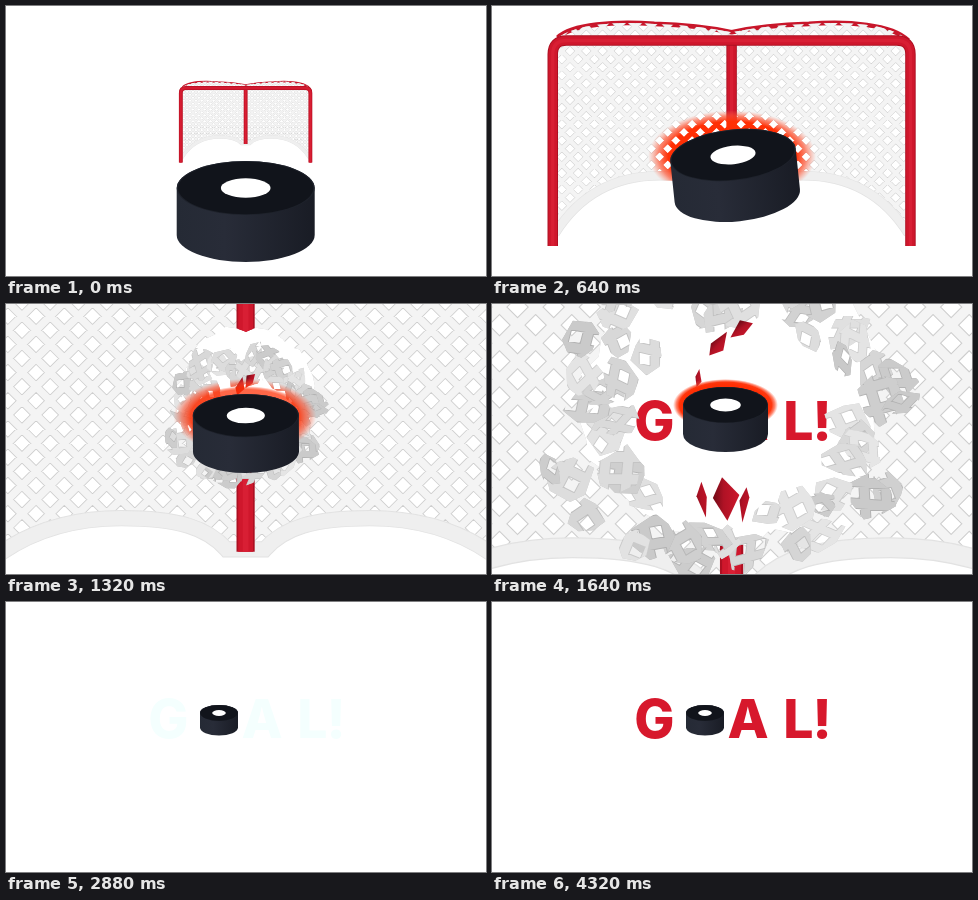
Animation, 480 px wide and 270 px high, one loop 4.8 s. Source, as an HTML page with a canvas:

```html
<!DOCTYPE html>
<html lang="en">
<head>
<meta charset="utf-8">
<title>Goal</title>
<style>
  html, body { margin: 0; width: 100%; height: 100%; overflow: hidden; background: #fff; }
  .stage { position: relative; width: 480px; height: 270px; overflow: hidden; }
  canvas, svg { position: absolute; left: 0; top: 0; display: block; }
  text { font: 800 53.5px Inter, Roboto, sans-serif; text-anchor: middle; }
</style>
</head>
<body>
<div class="stage">
  <svg width="480" height="270" viewBox="0 0 480 270">
    <g id="word">
      <text x="162.5" y="136.3">G</text>
      <text x="256" y="136.3">A</text>
      <text x="306.5" y="136.3">L</text>
      <text x="330" y="136.3">!</text>
    </g>
  </svg>
  <canvas id="view" width="480" height="270"></canvas>
</div>
<script>
const LOOP = 4800, STEP = 40, BREAK = 1120, TAU = Math.PI * 2;
const word = document.getElementById('word');
const g = document.getElementById('view').getContext('2d');
const clamp = (v, a = 0, b = 1) => Math.min(b, Math.max(a, v));
const ramp = (t, a, b) => clamp((t - a) / (b - a));

function random(seed) {
  return () => {
    seed = (seed * 1664525 + 1013904223) % 4294967296;
    return seed / 4294967296;
  };
}
const rnd = random(77);
const between = (a, b) => a + (b - a) * rnd();

// Puck: time, centre x, y of the top face, radii, height, tilt
const PUCK = [
  [0, 239.7, 182, 69, 27, 47, 0],
  [640, 241, 149, 63, 25.5, 41, -6],
  [1000, 242.7, 130, 60, 24, 40, -1],
  [1640, 233.5, 101, 42.5, 18, 29, 0],
  [2120, 213, 110, 19.5, 8, 14.5, 0],
  [2160, 213, 111, 19, 8, 14.5, 0]
];

// Smooth interpolation that never overshoots
function puckAt(t) {
  const last = PUCK.length - 1;
  if (t >= PUCK[last][0]) return PUCK[last].slice(1);
  let i = 0;
  while (t >= PUCK[i + 1][0]) i++;
  const slope = (k, c) => (PUCK[k + 1][c] - PUCK[k][c]) / (PUCK[k + 1][0] - PUCK[k][0]);
  const tangent = (k, c) => {
    if (k === 0) return slope(0, c);
    if (k === last) return 0;
    const a = slope(k - 1, c), b = slope(k, c);
    return a * b <= 0 ? 0 : 2 * a * b / (a + b);
  };
  const span = PUCK[i + 1][0] - PUCK[i][0], u = (t - PUCK[i][0]) / span;
  return [1, 2, 3, 4, 5, 6].map(c =>
    PUCK[i][c] * (1 + 2 * u) * (1 - u) ** 2 + PUCK[i + 1][c] * u * u * (3 - 2 * u) +
    span * (tangent(i, c) * u * (1 - u) ** 2 + tangent(i + 1, c) * u * u * (u - 1)));
}

function lattice(x0, y0, x1, y1, cell) {
  const p = new Path2D(), h = y1 - y0;
  for (let x = x0 - h; x < x1 + h; x += cell) {
    p.moveTo(x, y0); p.lineTo(x + h, y1);
    p.moveTo(x, y0); p.lineTo(x - h, y1);
  }
  return p;
}

// Net parts, in the size they have at the start
const hem = 'C186 136 200 131 214 131 C226 131 232 133 236 137.5 L244 137.5 ' +
            'C248 133 254 131 266 131 C280 131 294 136 304 152';
const roofEdge = 'C182 76 198 75 212 76 Q228 76.5 240 79 Q252 76.5 268 76 C282 75 298 76 304 82';
const mesh = lattice(170, 74, 310, 154, 5.9);
const meshArea = new Path2D('M176 82 ' + roofEdge + ' L304 152 C294 136 280 131 266 131 ' +
  'C254 131 248 133 244 137.5 L236 137.5 C232 133 226 131 214 131 C200 131 186 136 176 152 Z');
const hemLine = new Path2D('M176 152 ' + hem);
const roofLine = new Path2D('M177 81 ' + roofEdge);
const frame = new Path2D('M175.2 156.5 V87 Q175.2 82 180.2 82 H299.8 Q304.8 82 304.8 87 V156.5');
const post = new Path2D('M240 82 V138');

function stroke(path, ...layers) {
  for (const [color, width] of layers) {
    g.strokeStyle = color;
    g.lineWidth = width;
    g.stroke(path);
  }
}

const edge = Array.from({ length: 44 }, () => between(.93, 1.06));

function clipHole(t) {
  const r = 252 * ((t - BREAK) / 1000) ** .81;
  const cy = 92 + 41 * ramp(t, 1640, 2120);
  const hole = new Path2D();
  hole.rect(0, 0, 480, 270);
  edge.forEach((k, i) => {
    const a = i / edge.length * TAU;
    hole[i ? 'lineTo' : 'moveTo'](240 + Math.cos(a) * r * k, cy + Math.sin(a) * r * k);
  });
  hole.closePath();
  g.clip(hole, 'evenodd');
}

function drawNet(t) {
  if (t > 2320) return;
  const s = 1 + t * .00275 + Math.max(0, t - 1000) ** 2 * 1.5e-6;
  g.save();
  if (t > BREAK) clipHole(t);
  g.translate(239.6, 109);
  g.scale(s, s);
  g.translate(-240, -109);
  g.lineCap = 'butt';
  stroke(roofLine, ['#c8162a', 1.7]);
  g.save();
  g.clip(meshArea);
  stroke(mesh, ['#cecece', 1.9], ['#f4f4f4', 1.55]);
  g.restore();
  stroke(hemLine, ['#e2e2e2', 3.4], ['#efefef', 3]);
  const red = [['#ad1022', 3.8], ['#cf172c', 3.1], ['#d81f34', 1.2]];
  stroke(post, ...red);
  stroke(frame, ...red);
  g.restore();
}

function makeShard(x, y, size, red, options) {
  const p = { x, y, size, red, from: BREAK + STEP, when: 1640, pace: 360, thin: 1,
              rot: between(0, TAU), spin: between(-.002, .002), squash: between(.55, 1),
              tone: Math.round(between(200, 230)), strand: 10, shape: new Path2D(), ...options };
  const n = red ? 4 : 7;
  for (let i = 0; i < n; i++) {
    const a = (i + between(-.25, .25)) / n * TAU, r = size * between(.65, 1);
    p.shape.lineTo(Math.cos(a) * r, Math.sin(a) * r * p.thin);
  }
  p.shape.closePath();
  return p;
}

const strands = lattice(-60, -60, 60, 60, 33);
const shards = [];
for (let i = 0; i < 54; i++) {
  const a = (i + rnd()) / 54 * TAU, d = between(108, 195);
  shards.push(makeShard(240 + Math.cos(a) * d, 112 + Math.sin(a) * d * .8, between(19, 31), false));
}
// x, y, size, thinness, direction
for (const [x, y, size, thin, rot] of [
  [227, 41, 17, .6, 2.3], [250, 25, 15, .6, 2.5], [206, 75, 12, .35, 1.7],
  [210, 195, 22, .25, 1.45], [233, 196, 25, .6, 1.57], [252, 198, 22, .3, 1.75]
]) {
  shards.push(makeShard(x, y, size, true, { thin, rot, squash: 1 }));
}
// Slow pieces that leave last
for (const [x, y, size, red, thin, rot] of [
  [54, 144, 40, false, .45, 1.05], [43, 226, 52, false, .34, .2], [31, 126, 22, true, .3, 1.3],
  [249, 253, 28, true, .3, 1.0], [404, 267, 15, true, .5, .4], [459, 266, 36, false, .3, .1]
]) {
  shards.push(makeShard(x, y, size, red, {
    thin, rot, squash: 1, tone: 166, strand: 17, spin: .0004, from: 1680, when: 2120, pace: 1000
  }));
}

function drawShards(t) {
  if (t >= 2600) return;
  for (const p of shards) {
    const dt = t - p.when, k = Math.exp(dt / p.pace);
    const x = 240 + (p.x - 240) * k, y = 112 + (p.y - 112) * k;
    if (t < p.from || x < -90 || x > 570 || y < -90 || y > 360) continue;
    const size = clamp(.4 + .6 * k, .3, 1.5);
    g.save();
    g.translate(x, y);
    g.rotate(p.rot + p.spin * dt);
    g.scale(size, size * p.squash);
    if (p.red) {
      const shade = g.createLinearGradient(0, -p.size * .5, 0, p.size * .5);
      shade.addColorStop(0, '#c9172b');
      shade.addColorStop(.55, '#b01225');
      shade.addColorStop(1, '#6d0a16');
      g.fillStyle = shade;
      g.fill(p.shape);
    } else {
      const v = p.tone, d = v - 24;
      g.clip(p.shape);
      stroke(strands, [`rgb(${d},${d},${d})`, p.strand + 2], [`rgb(${v},${v},${v})`, p.strand]);
    }
    g.restore();
  }
}

function ring(cx, cy, w, h, alpha, core) {
  if (alpha <= 0) return;
  const glow = g.createRadialGradient(0, 0, 0, 0, 0, 1);
  glow.addColorStop(0, '#ff2800');
  glow.addColorStop(core, '#ff3005');
  glow.addColorStop((core + 1) / 2, 'rgba(255,75,40,.65)');
  glow.addColorStop(1, 'rgba(255,110,80,0)');
  g.save();
  g.globalAlpha *= alpha;
  g.translate(cx, cy);
  g.scale(w, h);
  g.fillStyle = glow;
  g.beginPath();
  g.arc(0, 0, 1, 0, TAU);
  g.fill();
  g.restore();
}

const glowLevel = t => ramp(t, 280, 560) * (1 - ramp(t, 1680, 1960));

// Tight flare straight behind the puck, once the net is open
function drawFlare(t, [cx, cy, rx, ry]) {
  ring(cx, cy, rx + 10, ry + 8, glowLevel(t) * ramp(t, 1100, 1400), .88);
}

// Wide light that falls only on strands and pieces
function drawLight(t, [cx, cy, rx, ry]) {
  const tight = ramp(t, 1100, 1640);
  g.save();
  g.globalCompositeOperation = 'source-atop';
  ring(cx - 1, cy + 1, rx + 21 - 6 * tight, ry + 20 - 9 * tight, glowLevel(t) * (1 - .35 * tight), .76);
  g.restore();
}

function oval(rx, ry, color) {
  g.fillStyle = color;
  g.beginPath();
  g.ellipse(0, 0, rx, ry, 0, 0, TAU);
  g.fill();
}

function drawPuck([cx, cy, rx, ry, h, tilt]) {
  g.save();
  g.translate(cx, cy);
  g.rotate(tilt * Math.PI / 180);
  const side = g.createLinearGradient(-rx, 0, rx, 0);
  side.addColorStop(0, '#252a35');
  side.addColorStop(.35, '#282c38');
  side.addColorStop(1, '#191c25');
  g.fillStyle = side;
  g.beginPath();
  g.ellipse(0, 0, rx, ry, 0, Math.PI, TAU);
  g.lineTo(rx, h);
  g.ellipse(0, h, rx, ry, 0, 0, Math.PI);
  g.closePath();
  g.fill();
  oval(rx, ry, '#1e222b');
  oval(rx * .98, ry * .97, '#11141b');
  oval(rx * .36, ry * .36, '#fff');
  g.restore();
}

function draw(t) {
  const puck = puckAt(t);
  g.clearRect(0, 0, 480, 270);
  word.style.visibility = t >= 1440 ? 'visible' : 'hidden';
  word.setAttribute('fill', Math.floor(t / 480) % 2 ? '#d7182c' : '#f4fffe');
  drawFlare(t, puck);
  drawNet(t);
  drawShards(t);
  drawLight(t, puck);
  drawPuck(puck);
}

const start = performance.now();
function tick() {
  const t = (performance.now() - start) % LOOP;
  draw(Math.floor(t / STEP) * STEP);
  requestAnimationFrame(tick);
}
tick();
</script>
</body>
</html>
```
